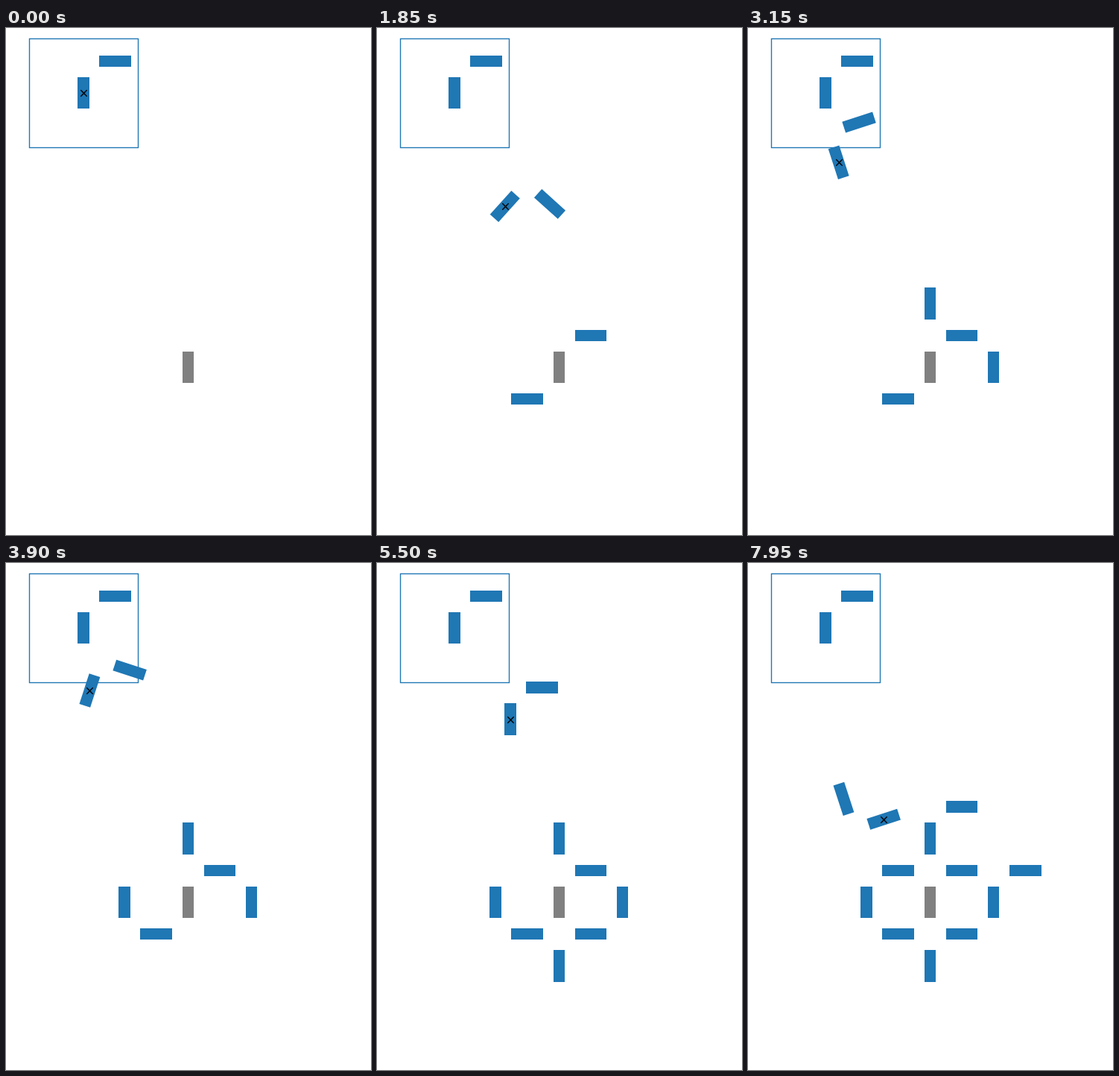
Write an HTML page with a canvas that moves like this. It is 490 by 680 pixels and loops after 8000 ms.

```html
<!DOCTYPE html>
<html lang="en">
<head>
<meta charset="utf-8">
<title>Tile growth</title>
<style>
  html, body { margin: 0; width: 100%; height: 100%; overflow: hidden; background: #fff; }
  canvas { display: block; }
</style>
</head>
<body>
<canvas id="stage" width="490" height="680"></canvas>
<script>
const ctx = document.getElementById('stage').getContext('2d');
const BLUE = '#1f77b4', GRAY = '#808080';
const FRAME_MS = 50, LOOP_FRAMES = 160, MOVE_FRAMES = 15;
const STEP = 42.65, HALF_LONG = 21.4, HALF_SHORT = 7.7;
const SEED = { x: 244.3, y: 455.06 };
const HOME = { x: 103.95, y: 87.06 };
const HOME_ARM = { x: HOME.x + STEP, y: HOME.y - STEP };

// Each move: grid cell (relative to the seed) where the arm lands, and its counter-clockwise turn.
const MOVES = [
  [1, -1, 0], [-1, 1, 180], [2, 0, -90], [0, -2, 90], [-2, 0, 90], [0, 2, -90],
  [1, 1, 180], [3, -1, 0], [1, -3, 0], [-1, -1, 180], [-3, 1, 180]
].map(([i, j, turn]) => ({ x: SEED.x + i * STEP, y: SEED.y + j * STEP, turn }));

// Upright bars snap to whole pixels; turned bars are antialiased.
function bar(x, y, horizontal, turn = 0, color = BLUE) {
  const hw = horizontal ? HALF_LONG : HALF_SHORT;
  const hh = horizontal ? HALF_SHORT : HALF_LONG;
  ctx.fillStyle = color;
  if (turn % 90 === 0) {
    const l = Math.round(x - hw), t = Math.round(y - hh);
    ctx.fillRect(l, t, Math.round(x + hw) - l, Math.round(y + hh) - t);
    return;
  }
  ctx.save();
  ctx.translate(x, y);
  ctx.rotate(-turn * Math.PI / 180);
  ctx.fillRect(-hw, -hh, 2 * hw, 2 * hh);
  ctx.restore();
}

function cross(x, y) {
  const cx = Math.round(x) + 0.5, cy = Math.round(y) + 0.5, r = 4.17;
  ctx.strokeStyle = '#000';
  ctx.lineWidth = 1.39;
  ctx.beginPath();
  ctx.moveTo(cx - r, cy - r);
  ctx.lineTo(cx + r, cy + r);
  ctx.moveTo(cx - r, cy + r);
  ctx.lineTo(cx + r, cy - r);
  ctx.stroke();
}

// The arm travels straight while the marked bar swings around it.
function movingTile(move, k) {
  const x = HOME_ARM.x + k * (move.x - HOME_ARM.x);
  const y = HOME_ARM.y + k * (move.y - HOME_ARM.y);
  const turn = k * move.turn;
  const a = turn * Math.PI / 180, c = Math.cos(a), s = Math.sin(a);
  const mx = x + STEP * (s - c), my = y + STEP * (s + c);
  bar(mx, my, false, turn);
  bar(x, y, true, turn);
  cross(mx, my);
}

function draw(frame) {
  const n = Math.floor(frame / MOVE_FRAMES);
  ctx.fillStyle = '#fff';
  ctx.fillRect(0, 0, 490, 680);
  ctx.strokeStyle = BLUE;
  ctx.lineWidth = 1.39;
  ctx.strokeRect(31.5, 14.5, 146, 146);
  bar(HOME.x, HOME.y, false);
  bar(HOME_ARM.x, HOME_ARM.y, true);
  bar(SEED.x, SEED.y, false, 0, GRAY);
  for (const m of MOVES.slice(0, n)) bar(m.x, m.y, m.turn % 180 === 0);
  movingTile(MOVES[n], (frame % MOVE_FRAMES) / MOVE_FRAMES);
}

const start = performance.now();
function tick() {
  const t = performance.now() - start;
  draw(Math.floor(t / FRAME_MS + 1e-6) % LOOP_FRAMES);
  requestAnimationFrame(tick);
}
tick();
</script>
</body>
</html>
```
